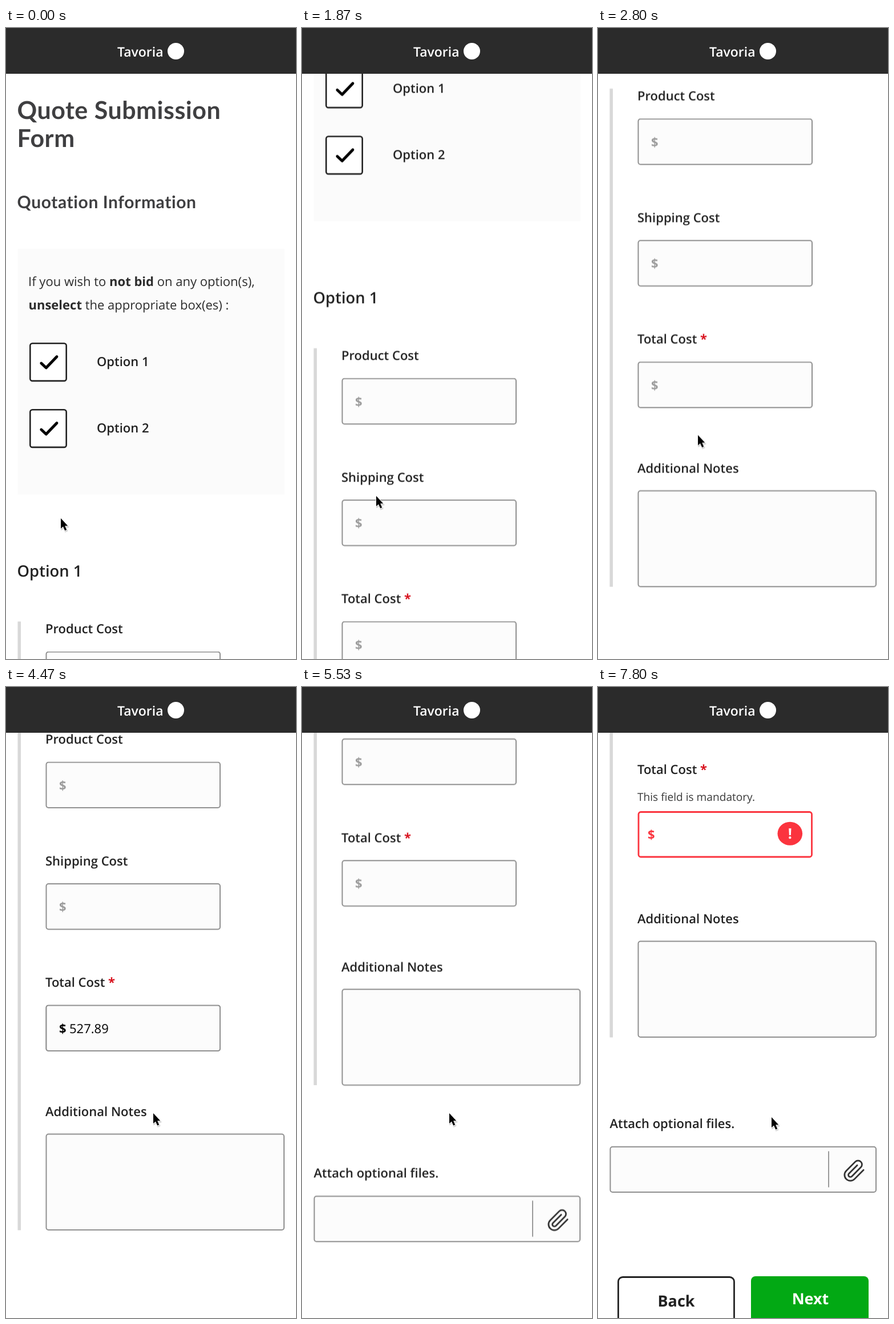
Write an HTML page that moves like this. It is 508 px wide and 1103 px high and loops after 8 s.

```html
<!DOCTYPE html>
<html lang="en">
<head>
<meta charset="utf-8">
<title>Quote form</title>
<style>
html, body { margin: 0; width: 100%; height: 100%; overflow: hidden; background: #fff; }
svg { display: block; width: 508px; height: 1103px; }
text { font: 600 22px "Open Sans", sans-serif; fill: #222; text-rendering: geometricPrecision; }
.title { font: 700 43px Lato, sans-serif; letter-spacing: .5px; fill: #3f3f41; }
.subtitle { font: 700 30px Lato, sans-serif; letter-spacing: .6px; fill: #3f3f41; }
.heading { font-size: 27.4px; }
.plain { font-weight: 400; fill: #2c2c2c; }
.hint { font-weight: 400; font-size: 19.1px; fill: #3a3a3a; }
.bold, .plain tspan { font-weight: 700; }
.button { font-weight: 700; font-size: 27px; text-anchor: middle; }
.brand { font-size: 23px; fill: #fff; }
.star { fill: #d8101c; font-weight: 700; }
.dollar { font-weight: 700; fill: #9c9c9c; }
.box { fill: #fcfcfc; stroke: #8f8f8f; stroke-width: 2; }
.bar { fill: #d8d8d8; }

/* One loop is 8 s, so 1% is 80 ms */
.page, .pointer, .value, .error, .normal, .notes, .footer, .grow {
  animation: 8s linear infinite;
}
.page { animation-name: scroll; }
.pointer { animation-name: point; }
.value { animation-name: fill-in; }
.error { animation-name: show-error; }
.normal { animation-name: hide-normal; }
.notes { animation-name: push-notes; }
.footer { animation-name: push-footer; }
.grow { animation-name: grow; }

@keyframes scroll {
  0% { transform: translateY(0); }
  13.1% { transform: translateY(0); animation-timing-function: cubic-bezier(.3, .1, .4, 1); }
  20%, 23% { transform: translateY(-450px); }
  23.375% { transform: translateY(-476.5px); animation-timing-function: cubic-bezier(.25, .45, .4, 1); }
  31.6%, 55.5% { transform: translateY(-931.5px); }
  55.875% { transform: translateY(-958.5px); animation-timing-function: cubic-bezier(.35, .07, .65, .86); }
  61.625% { transform: translateY(-2005.5px); animation-timing-function: cubic-bezier(.25, .52, .4, 1); }
  65.875%, 66.3% { transform: translateY(-2150px); }
  69.125% { transform: translateY(-2347px); animation-timing-function: cubic-bezier(.2, .6, .4, 1); }
  76.6%, 83.75% { transform: translateY(-2462px); }
  85%, 100% { transform: translateY(-2467px); }
}
@keyframes point {
  0%, 1.4% { transform: translate(96px, 857px); animation-timing-function: ease-in-out; }
  6.625%, 33% { transform: translate(130px, 818px); animation-timing-function: cubic-bezier(.4, .2, .7, .8); }
  35% { transform: translate(175px, 712px); animation-timing-function: cubic-bezier(.2, .6, .4, 1); }
  40.9%, 48.1% { transform: translate(183px, 634px); animation-timing-function: ease-in-out; }
  50.9%, 77.3% { transform: translate(258px, 745px); animation-timing-function: ease-in-out; }
  81.6%, 88.9% { transform: translate(424px, 1009px); animation-timing-function: ease-in-out; }
  97.5%, 100% { transform: translate(304px, 752px); }
}
@keyframes fill-in { 0%, 42.9% { opacity: 0; } 44.1%, 100% { opacity: 1; } }
@keyframes show-error { 0%, 83.75% { opacity: 0; } 85%, 100% { opacity: 1; } }
@keyframes hide-normal { 0%, 83.75% { opacity: 1; } 85%, 100% { opacity: 0; } }
@keyframes push-notes { 0%, 83.75% { transform: none; } 85%, 100% { transform: translateY(35.5px); } }
@keyframes push-footer { 0%, 83.75% { transform: none; } 85%, 100% { transform: translateY(33px); } }
@keyframes grow { 0%, 83.75% { height: 871px; } 85%, 100% { height: 906.5px; } }
</style>
</head>
<body>
<svg viewBox="0 0 508 1103">
  <defs>
    <g id="check">
      <rect x="42.3" y="1.3" width="63.4" height="65.6" rx="4" fill="#fff" stroke="#222" stroke-width="2.6"/>
      <path d="M61.8 36L70.3 44L89 24.5" fill="none" stroke="#000" stroke-width="4.8" stroke-linecap="round" stroke-linejoin="round"/>
    </g>
    <rect id="field" class="box" x="70.5" y="1" width="304.5" height="79.5" rx="4"/>
    <g id="empty">
      <use href="#field"/>
      <text class="dollar" x="93" y="49">$</text>
    </g>
    <g id="costs">
      <text x="69" y="20.5">Product Cost</text>
      <use href="#empty" y="52"/>
      <text x="69" y="233">Shipping Cost</text>
      <use href="#empty" y="264.5"/>
      <text x="69" y="445.5">Total Cost <tspan class="star">*</tspan></text>
    </g>
    <g id="notes">
      <text x="69" y="671.5">Additional Notes</text>
      <rect class="box" x="70.5" y="703" width="416.5" height="167.5" rx="4"/>
    </g>
  </defs>

  <g class="page">
    <text class="title" x="19.5" y="158.5">Quote Submission</text>
    <text class="title" x="19.5" y="207.5">Form</text>
    <text class="subtitle" x="19.5" y="314.5">Quotation Information</text>

    <rect x="20.5" y="386" width="467.5" height="429.5" fill="#fbfbfb"/>
    <text class="plain" x="39" y="451">If you wish to <tspan>not bid</tspan> on any option(s),</text>
    <text class="plain" x="39.5" y="492"><tspan>unselect</tspan> the appropriate box(es) :</text>
    <use href="#check" y="550"/>
    <text x="159" y="591">Option 1</text>
    <use href="#check" y="666"/>
    <text x="159" y="707">Option 2</text>

    <g transform="translate(0 1037.5)">
      <text class="heading" x="19.5" y="-78.5">Option 1</text>
      <rect class="bar" x="20.5" width="5.5" height="871"/>
      <use href="#costs"/>
      <use href="#empty" y="477"/>
      <g class="value">
        <use href="#field" y="477"/>
        <text class="plain" x="93" y="526" style="fill:#000"><tspan>$</tspan></text>
        <text class="plain" x="111" y="526" style="fill:#000">527.89</text>
      </g>
      <use href="#notes"/>
    </g>

    <g transform="translate(0 2173)">
      <text class="heading" x="19.5" y="-78.5">Option 2</text>
      <rect class="bar grow" x="20.5" width="5.5" height="871"/>
      <use href="#costs"/>
      <use class="normal" href="#empty" y="477"/>
      <g class="error">
        <text class="hint" x="69" y="492.5">This field is mandatory.</text>
        <rect x="71" y="512.5" width="303.5" height="78.5" rx="4" fill="#fff" stroke="#fb343e" stroke-width="2.8"/>
        <text class="bold" x="87" y="560" style="fill:#fb343e">$</text>
        <ellipse cx="336.3" cy="550.3" rx="21.8" ry="20.5" fill="#fb343e"/>
        <text class="button" x="336.3" y="559" style="fill:#fff;font-size:25px">!</text>
      </g>
      <g class="notes"><use href="#notes"/></g>

      <g class="footer">
        <text x="20.5" y="1032">Attach optional files.</text>
        <rect class="box" x="21.5" y="1064.8" width="465.5" height="79.2" rx="4"/>
        <path d="M404 1072.5V1135.5" stroke="#8f8f8f" stroke-width="1.8"/>
        <path transform="translate(450 1106) rotate(45) scale(.93)" d="M11-12V12A11 11 0 0 1-11 12V-12A7.4 7.4 0 0 1 3.8-12V12A3.8 3.8 0 0 1-3.8 12V-10" fill="none" stroke="#333" stroke-width="3" stroke-linecap="round"/>
        <rect x="35.5" y="1292.5" width="203" height="82" rx="8" fill="#fff" stroke="#222" stroke-width="2.8"/>
        <text class="button" x="137" y="1344">Back</text>
        <rect x="268" y="1291" width="206" height="85" rx="8" fill="#02a914"/>
        <text class="button" x="372" y="1340" style="fill:#fff">Next</text>
      </g>
    </g>
  </g>

  <rect width="508" height="80" fill="#2b2b2b"/>
  <text class="brand" x="195" y="49.5">Tavoria</text>
  <circle cx="297.5" cy="40.5" r="14.5" fill="#fff"/>

  <g class="pointer">
    <path d="M1 2V20L5 17L8 23.5L11.5 22L8.5 15.5H13.5Z" fill="#000" opacity=".16" stroke="#000" stroke-width="2" stroke-linejoin="round"/>
    <path d="M0 0V18L4 14.5L7.2 21.6L10.2 20.3L7.2 13.3H12.3Z" fill="#000" stroke="#fff" stroke-width="1.6" stroke-linejoin="round" paint-order="stroke"/>
  </g>
</svg>
</body>
</html>
```
